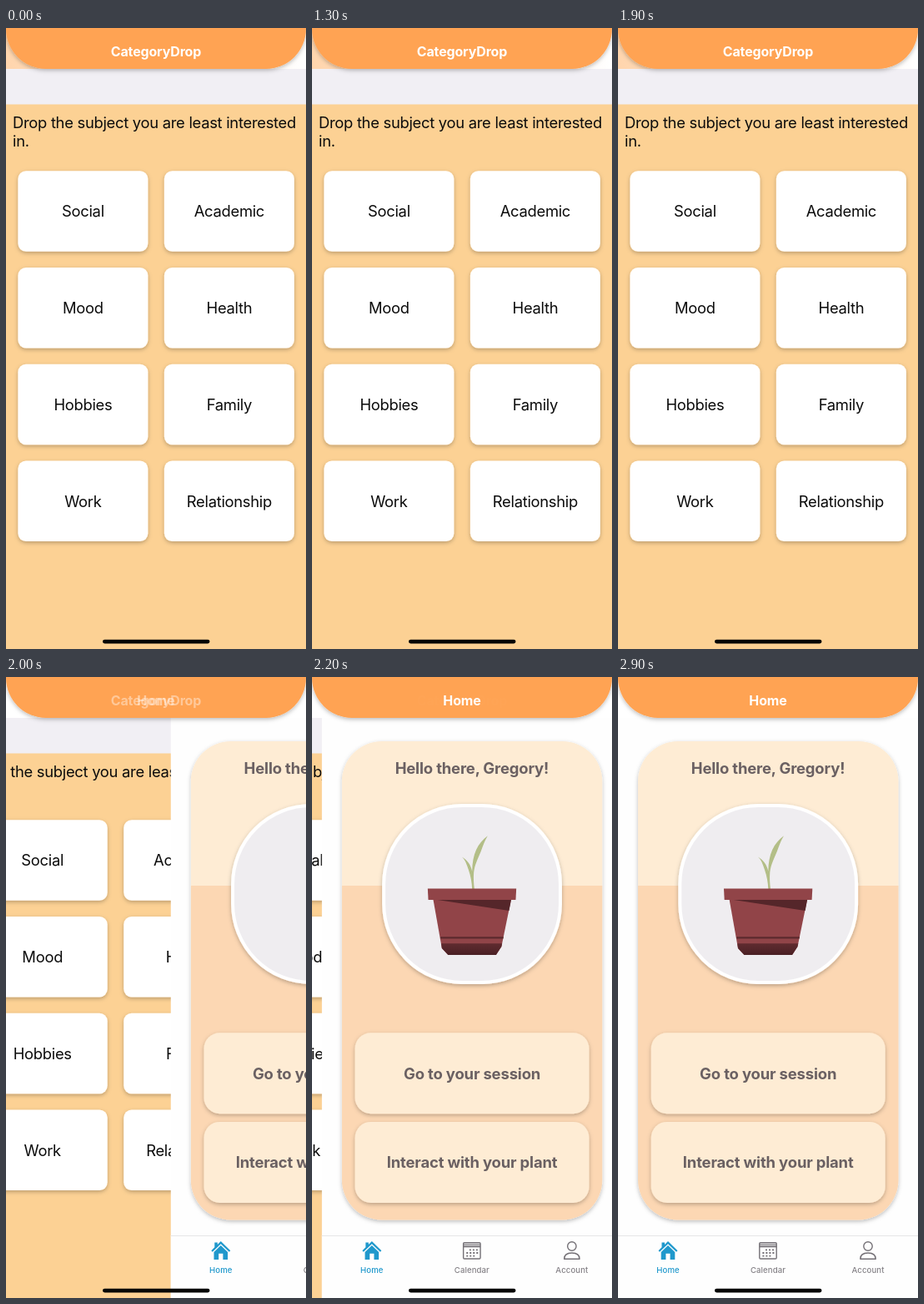
An HTML page that plays this animation: 360 px wide and 744 px high, repeating every 3 s.

```html
<!DOCTYPE html>
<html lang="en">
<head>
<meta charset="utf-8">
<title>Category drop</title>
<style>
  html, body { margin: 0; width: 100%; height: 100%; overflow: hidden; background: #fff; }
  svg { display: block; width: 100%; height: 100%; }
  text { font-family: Inter, Roboto, sans-serif; font-optical-sizing: none; }
  .body { font-size: 18.4px; letter-spacing: -.016em; fill: #0c0c0c; }
  .title { font-size: 16px; font-weight: 700; letter-spacing: -.01em; fill: #fff; }
  .strong { font-size: 18.5px; font-weight: 700; letter-spacing: -.01em; fill: #6a6062; }
  .tab { font-size: 9.6px; font-weight: 500; letter-spacing: .01em; fill: #858287; }
  .mid { text-anchor: middle; }
  .icon { fill: none; stroke: #747076; stroke-width: 1.4; }
</style>
</head>
<body>
<svg viewBox="0 0 360 744">
  <defs>
    <linearGradient id="fade">
      <stop offset="0" stop-color="#ffd5ad"/>
      <stop offset="1" stop-color="#fff"/>
    </linearGradient>
    <linearGradient id="base" x2="0" y2="1">
      <stop offset="0" stop-color="#5f2b2f"/>
      <stop offset="1" stop-color="#4b2125"/>
    </linearGradient>
    <filter id="shadow" x="-10%" y="-15%" width="120%" height="135%">
      <feDropShadow dx="0" dy="1.9" stdDeviation="2.5" flood-opacity=".26"/>
    </filter>
    <clipPath id="panel"><rect x="24" y="77" width="312.5" height="573.5" rx="48"/></clipPath>
  </defs>

  <g id="drop">
    <rect y="49" width="360" height="43" fill="#f1eff4"/>
    <rect y="91.5" width="360" height="653" fill="#fcd194"/>
    <text class="body" x="8" y="119.8">Drop the subject you are least interested</text>
    <text class="body" x="8" y="142.3">in.</text>
    <g id="cards"></g>
  </g>

  <g id="home">
    <rect width="360" height="744" fill="#fefefe"/>
    <g filter="url(#shadow)">
      <g clip-path="url(#panel)">
        <rect x="24" y="77" width="313" height="174" fill="#feecd4"/>
        <rect x="24" y="250" width="313" height="401" fill="#fcd7b3"/>
      </g>
    </g>
    <text class="strong mid" x="180" y="116">Hello there, Gregory!</text>
    <rect x="74.3" y="154" width="211.8" height="212" rx="94" fill="#efedf0" stroke="#fff" stroke-width="4" filter="url(#shadow)"/>

    <g id="plant">
      <path fill="#b3be87" d="M180.3 254C180 246 178.5 238 176 231C174 225 172 219 168 215.5C174 219 179 225 180.3 233C180.5 212 187 199 199 190.3C195 197 193.5 202 190.8 209C187.5 217.5 183.5 224 182.3 234C181.8 241 182.2 247 183 254Z"/>
      <path fill="#914448" d="M133.5 266H227.2L215.5 323L209 333H151.5L144 325Z"/>
      <path fill="#55262a" d="M135.5 266.5H227.2L224.6 280Z"/>
      <path fill="#5c2a2e" d="M142 311.2H218L217.6 313.4H142.4Z"/>
      <path fill="url(#base)" d="M143.2 319.3H216.3L215.5 323L209 333H151.5L144 325Z"/>
      <path fill="#914448" d="M127 253.5H233.3L232.6 267H127.7Z"/>
    </g>

    <g id="buttons"></g>

    <rect y="669" width="360" height="75" fill="#fefefe"/>
    <rect y="669" width="360" height="1" fill="#e6e5e7"/>
    <path fill="#1f98cc" d="M52.5 677.5H56V680L60 676L71.5 687.2L70 688.8L60 679.2L50 688.8L48.5 687.2L52.5 683.3ZM60 681L68.3 688.9V698H62.6V690.8H57.4V698H51.7V688.9Z"/>
    <g class="icon">
      <rect x="169.8" y="677.6" width="20.4" height="19.4" rx="1.2"/>
      <path d="M169.8 680.2H190.2" stroke-width="3.4" opacity=".55"/>
      <path d="M169.8 682.6H190.2"/>
      <path d="M177 686.4H187.5M173.4 690H187.5M173.4 693.6H184" stroke-width="1.8" stroke-dasharray="2 2"/>
      <circle cx="300" cy="682" r="5.2"/>
      <path d="M290.8 697.2C290.8 692 294.2 690 300 690S309.2 692 309.2 697.2Z" stroke-linejoin="round"/>
    </g>
    <text class="tab mid" x="60" y="714" style="fill:#1f98cc">Home</text>
    <text class="tab mid" x="180" y="714">Calendar</text>
    <text class="tab mid" x="300" y="714">Account</text>
  </g>

  <rect width="360" height="49" fill="#fff"/>
  <rect id="backdrop" width="360" height="49" fill="url(#fade)"/>
  <path fill="#ffa353" filter="url(#shadow)" d="M0 -6H360V1A48 48 0 0 1 312 49H48A48 48 0 0 1 0 1Z"/>
  <text id="dropTitle" class="title mid" x="180" y="34">CategoryDrop</text>
  <text id="homeTitle" class="title mid" x="180" y="34">Home</text>
  <rect x="116" y="732.7" width="128.5" height="4.8" rx="2.4" fill="#050505"/>
</svg>

<script>
const LOOP = 3000, STEP = 100, WIDTH = 360;
const PRESS = 1600, RELEASE = 250, PUSH = 1918, PLANT_LOADED = 2100;
const $ = id => document.getElementById(id);

function box(x, y, w, h, r, fill, style, label) {
  return `<g><rect x="${x}" y="${y}" width="${w}" height="${h}" rx="${r}" fill="${fill}" filter="url(#shadow)"/>
    <text class="${style} mid" x="${x + w / 2}" y="${y + h / 2 + 7}">${label}</text></g>`;
}

const subjects = ["Social", "Academic", "Mood", "Health", "Hobbies", "Family", "Work", "Relationship"];
$("cards").innerHTML = subjects.map((name, i) =>
  box(14.4 + (i % 2) * 175.5, 171.2 + (i >> 1) * 115.75, 156, 96.5, 9.6, "#fff", "body", name)).join("");
$("buttons").innerHTML = ["Go to your session", "Interact with your plant"].map((name, i) =>
  box(39.7, 426.2 + i * 106.7, 281, 97, 19.2, "#feecd4", "strong", name)).join("");

const health = $("cards").children[subjects.indexOf("Health")];

function easeInOut(u) {
  return u < .5 ? 2 * u * u : 1 - 2 * (1 - u) ** 2;
}

// Remaining share of the push, as a critically damped spring
function remaining(t) {
  const s = Math.max(0, t - PUSH) * .0186;
  return (1 + s) * Math.exp(-s);
}

function show(id, visible) {
  $(id).setAttribute("display", visible ? "inline" : "none");
}

function draw(t) {
  const rest = remaining(t);
  const release = Math.min(1, Math.max(0, (t - PRESS) / RELEASE));
  health.setAttribute("opacity", t < PRESS ? 1 : .2 + .8 * easeInOut(release));
  $("drop").setAttribute("transform", `translate(${-.3 * WIDTH * (1 - rest)} 0)`);
  $("home").setAttribute("transform", `translate(${WIDTH * rest} 0)`);
  show("home", t >= PUSH);
  show("backdrop", t < PUSH);
  show("plant", t >= PLANT_LOADED);
  $("dropTitle").setAttribute("opacity", rest ** 1.5);
  $("homeTitle").setAttribute("opacity", 1 - rest);
}

const start = performance.now();
function tick() {
  const t = (performance.now() - start) % LOOP;
  draw(Math.floor(t / STEP) * STEP);
  requestAnimationFrame(tick);
}
draw(0);
requestAnimationFrame(tick);
</script>
</body>
</html>
```
